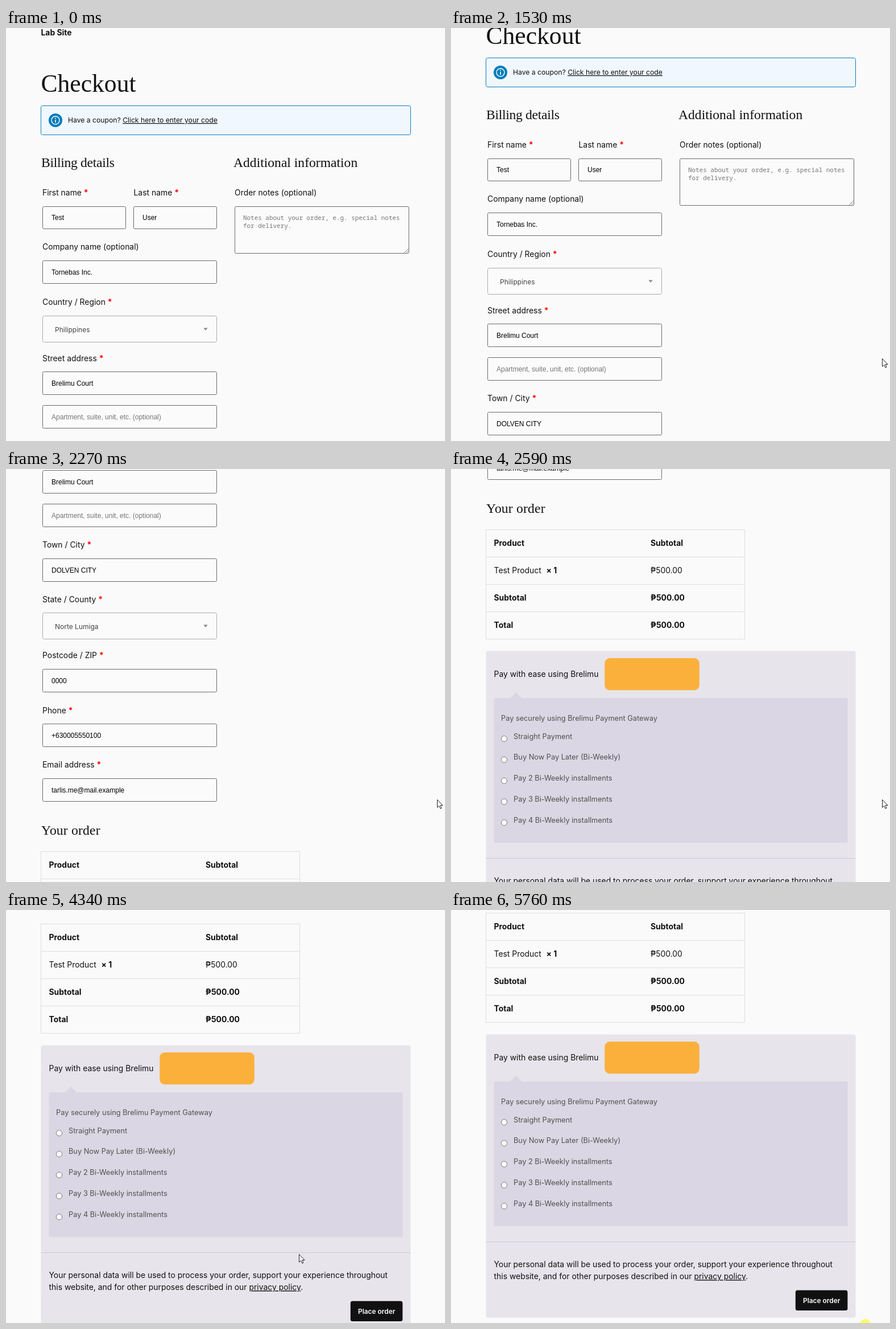
These frames come from a looping animation (772 px wide and 725 px high, 5880 ms). An HTML page:

```html
<!DOCTYPE html>
<html lang="en">
<head>
<meta charset="utf-8">
<title>Checkout</title>
<style>
  html, body { margin: 0; width: 100%; height: 100%; overflow: hidden; background: #fafafa; }
  svg { display: block; width: 772px; height: 725px; }
  text { font: 13.92px Inter, sans-serif; fill: #111; }
  .b { font-weight: 700; }
  .req { font-weight: 700; fill: #f00; }
  .h1 { font: 43.6px "Liberation Serif", serif; }
  .h2 { font: 23.6px "Liberation Serif", serif; }
  .small { font-size: 12.18px; }
  .link { text-decoration: underline; }
  .input { font: 12px "Liberation Sans", sans-serif; fill: #000; }
  .hint { font: 12px "Liberation Sans", sans-serif; fill: #757575; }
  .mono { font: 10.95px "Noto Sans Mono", monospace; fill: #757575; }
  .select { font-size: 12px; fill: #444; }
  .pay { font-size: 12.78px; fill: #515151; }
  .button { font-size: 11.9px; font-weight: 600; fill: #fff; }
  .field { fill: #fbfbfb; stroke: #6b6b6b; }
  .pick { fill: #fbfbfb; stroke: #aaa; }
  .rule { fill: none; stroke: #dedede; }
  .radio { fill: #fff; stroke: #767676; }
  .radio.over { stroke: #444; }
  #order { fill: #111; }
  #order.over { fill: #333; }
</style>
</head>
<body>
<svg viewBox="0 0 772 725">
  <g id="page"></g>
  <circle id="click" cx="728.5" cy="728" r="10" fill="#fffa66"/>
  <path id="cursor" d="M.5 .5V14.2L3.7 11.3 5.9 16.2 8 15.2 5.9 10.5H10Z"
        fill="#fff" stroke="#222" stroke-linejoin="round"/>
</svg>
<script>
const LOOP = 5880, LEAD = 100, STEP = 62;
const $ = id => document.getElementById(id);

// y is the middle of the capitals; baselines sit on whole pixels
const text = (x, y, s, cls = '', drop = 5) =>
  `<text x="${x}" y="${Math.ceil(y + drop - .5)}" class="${cls}">${s}</text>`;
const box = (x, y, w, h, cls, r = 2) =>
  `<rect x="${x + .5}" y="${y + .5}" width="${w - 1}" height="${h - 1}" rx="${r}" class="${cls}"/>`;
const label = (x, y, s, required) =>
  text(x, y, s + (required ? ' <tspan class="req">*</tspan>' : ''));
const field = (x, y, w, h, s, cls = 'input') =>
  box(x, y, w, h, 'field') + text(x + 16, y + h / 2, s, cls, 4.3);
const select = (y, s) =>
  box(64, y, 307, 47, 'pick', 3) + text(86, y + 24.5, s, 'select', 4.3) +
  `<path d="M347.3 ${y + 21.5}h7.4l-3.7 4.6z" fill="#888"/>`;

const header =
  text(61.5, 8.5, 'Lab Site', 'b') +
  text(61.5, 97, 'Checkout', 'h1', 15) +
  `<rect x="61.5" y="136.5" width="650" height="51" rx="3" fill="#f0f7fe" stroke="#0a80bb"/>
   <circle cx="87" cy="162" r="12" fill="#007cba"/>
   <circle cx="87" cy="162" r="7" fill="none" stroke="#fff" stroke-width="1.4"/>
   <path d="M87 161v5M87 157.6v1.8" stroke="#fff" stroke-width="1.6"/>` +
  text(109, 162, 'Have a coupon? <tspan class="link">Click here to enter your code</tspan>', 'small', 4.3);

const billing =
  `<g letter-spacing="-.3">${text(62, 236, 'Billing details', 'h2', 8)}</g>` +
  label(64, 289, 'First name', true) + field(64, 313, 147, 40, 'Test') +
  label(224.5, 289, 'Last name', true) + field(224, 313, 147, 40, 'User') +
  label(64, 384.5, 'Company name (optional)') + field(64, 408, 307, 41, 'Tornebas Inc.') +
  label(64, 481, 'Country / Region', true) + select(505, 'Philippines') +
  label(64, 580, 'Street address', true) + field(64, 603, 307, 41, 'Brelimu Court') +
  field(64, 662, 307, 41, 'Apartment, suite, unit, etc. (optional)', 'hint') +
  label(64, 734, 'Town / City', true) + field(64, 758, 307, 41, 'DOLVEN CITY') +
  label(64, 830.5, 'State / County', true) + select(853, 'Norte Lumiga') +
  label(64, 928.5, 'Postcode / ZIP', true) + field(64, 952, 307, 41, '0000') +
  label(64, 1025, 'Phone', true) + field(64, 1048, 307, 41, '+630005550100') +
  label(64, 1120.5, 'Email address', true) + field(64, 1144, 307, 41, 'tarlis.me@mail.example');

const notes =
  text(400, 236, 'Additional information', 'h2', 8) +
  label(402, 289, 'Order notes (optional)') +
  box(402, 313, 307, 83, 'field') +
  text(417, 333, 'Notes about your order, e.g. special notes', 'mono', 3.7) +
  text(417, 347, 'for delivery.', 'mono', 3.7) +
  '<path d="M700.5 394.5l7-7M704.5 394.5l3-3" stroke="#777"/>';

const rows = [
  ['Product', 'Subtotal', 'b'],
  ['Test Product', '₱500.00', ''],
  ['Subtotal', '₱500.00', 'b'],
  ['Total', '₱500.00', 'b']
];
const order =
  `<g letter-spacing=".2">${text(62, 1235, 'Your order', 'h2', 8)}</g>` +
  box(61, 1272, 456, 193, 'rule', 0) +
  rows.map(([name, sum, cls], i) => {
    const y = 1296 + 48 * i;
    return (i ? `<path d="M62 ${1272.5 + 48 * i}H516" class="rule"/>` : '') +
      text(75.5, y, name, cls) + text(351, y, sum, cls);
  }).join('') +
  text(167.5, 1344, '× 1', 'b');

const options = ['Straight Payment', 'Buy Now Pay Later (Bi-Weekly)',
  ...[2, 3, 4].map(n => `Pay ${n} Bi-Weekly installments`)];
const radioY = i => 1639.6 + 36.8 * i;
const payment =
  `<rect x="61.5" y="1485.5" width="650" height="497" rx="4" fill="#e7e4eb"/>
   <rect x="270.3" y="1498" width="166.5" height="56.3" rx="9" fill="#fbb03b"/>
   <path d="M103.5 1568.5l10.5-10.5 10.5 10.5z" fill="#dad6e3"/>
   <rect x="75.5" y="1568" width="622" height="254" rx="2" fill="#dad6e3"/>
   <path d="M61.5 1849.5h650" stroke="#cfcbd5"/>` +
  text(75.5, 1526, 'Pay with ease using Brelimu') +
  text(88, 1603, 'Pay securely using Brelimu Payment Gateway', 'pay', 4.6) +
  options.map((s, i) =>
    `<circle cx="93.5" cy="${radioY(i)}" r="5.1" class="radio"/>` +
    text(110, radioY(i) - 4.5, s, 'pay', 4.6)).join('') +
  text(75.5, 1889, 'Your personal data will be used to process your order, support your experience throughout') +
  text(75.5, 1910, 'this website, and for other purposes described in our <tspan class="link">privacy policy</tspan>.') +
  '<rect id="order" x="605.8" y="1934.6" width="91.6" height="35.4" rx="3.5"/>' +
  text(619, 1952.5, 'Place order', 'button', 4.3);

$('page').innerHTML = header + billing + notes + order + payment;

// keys: [step, ...values]
const scrollKeys = [[19, 0], [23, 84], [29, 350], [32, 581], [34, 581], [35, 601], [40, 1166],
  [41, 1222], [42, 1245], [67, 1245], [68, 1248], [70, 1262], [71, 1267]];
const cursorKeys = [[-1, 790, 730], [0, 764, 684], [2, 748, 640], [4, 742, 606], [6, 762, 581],
  [8, 762, 581], [11, 758, 580], [45, 758, 580], [47, 520, 605], [49, 273, 567], [51, 165, 460],
  [53, 140, 377], [55, 138, 392], [58, 148, 500], [61, 150, 601], [62, 150, 601], [64, 205, 604],
  [68, 515, 604], [72, 592, 680], [73, 614, 688], [76, 690, 705], [78, 718, 740]];

function at(keys, step) {
  const next = keys.findIndex(k => k[0] > step);
  if (next === 0) return keys[0].slice(1);
  if (next < 0) return keys[keys.length - 1].slice(1);
  const a = keys[next - 1], b = keys[next];
  const f = (step - a[0]) / (b[0] - a[0]);
  return a.slice(1).map((v, i) => Math.round(v + (b[i + 1] - v) * f));
}

const radios = [...document.querySelectorAll('.radio')];
const start = performance.now();

function draw() {
  const time = (performance.now() - start) % LOOP;
  const step = Math.max(-1, Math.floor((time - LEAD) / STEP));
  const [scroll] = at(scrollKeys, step);
  const [x, y] = at(cursorKeys, step);
  const pageY = y + scroll;
  $('page').setAttribute('transform', `translate(0 ${-scroll})`);
  $('cursor').setAttribute('transform', `translate(${x} ${y})`);
  $('click').style.display = step >= 91 ? '' : 'none';
  radios.forEach((r, i) =>
    r.classList.toggle('over', x > 88 && x < 300 && Math.abs(pageY - radioY(i)) < 12));
  $('order').classList.toggle('over', x > 606 && x < 697 && pageY > 1935 && pageY < 1970);
  requestAnimationFrame(draw);
}
draw();
</script>
</body>
</html>
```
